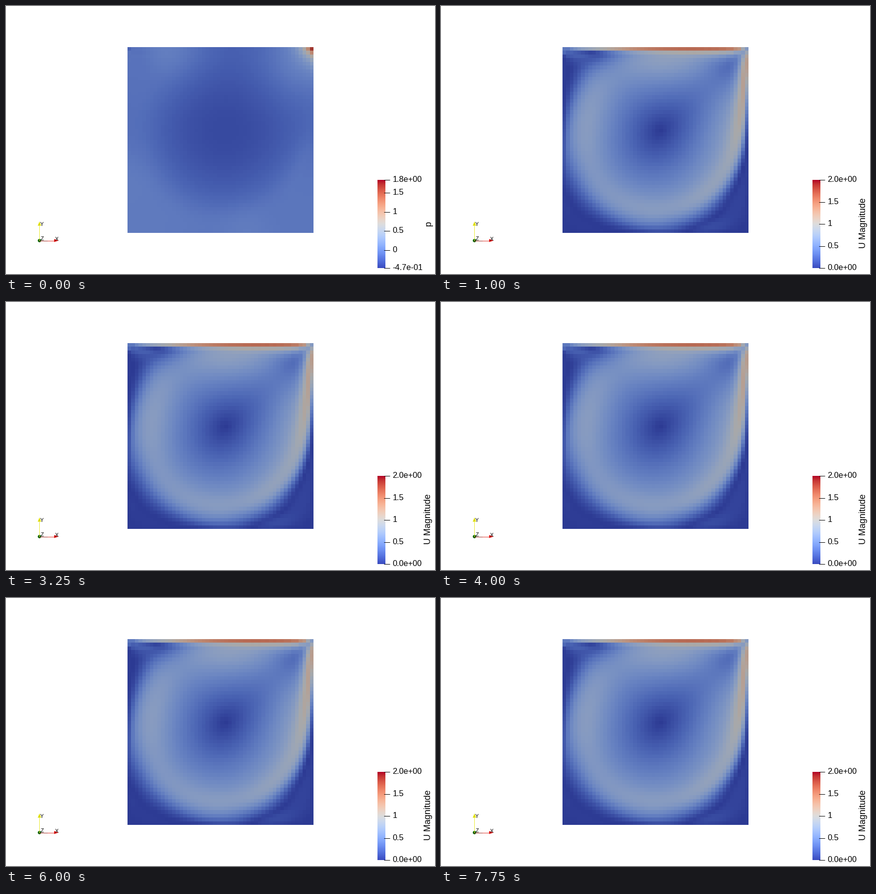
A matplotlib script that plays this animation: 865x541 px, repeating every 8 s.

```python
import numpy as np
import matplotlib.pyplot as plt
from matplotlib.animation import FuncAnimation
from matplotlib.patches import Circle, Polygon

W, H, DPI = 865, 541, 100
PX = 72 / DPI
N, REYNOLDS, LID = 50, 2000, 2.0
SHADE = 0.765
LEFT, TOP, SIDE = 245, 83, 375
BAR = (749, 765, 529, 351)
FRAMES, INTERVAL = 32, 250

plt.rcParams["font.family"] = "Liberation Sans"
cmap = plt.get_cmap("coolwarm")


def solve_cavity(n, re, dt=0.02, t_end=90):
    """Lid-driven cavity, collocated finite volumes; returns speed and pressure."""
    h, nu = 1 / n, 1 / re
    k = np.arange(n)
    basis = np.cos(np.pi * np.outer(k + 0.5, k) / n)
    basis /= np.linalg.norm(basis, axis=0)
    lam = (2 * np.cos(np.pi * k / n) - 2) / h**2
    lam = lam[:, None] + lam[None, :]
    lam[0, 0] = 1

    def with_ghosts(q, sign, lid=0.0):
        g = np.zeros((n + 2, n + 2))
        g[1:-1, 1:-1] = q
        g[0], g[-1] = sign * g[1], sign * g[-2]
        g[:, 0], g[:, -1] = sign * g[:, 1], 2 * lid + sign * g[:, -2]
        return g

    def transport(q, lid, fx, fy):
        g = with_ghosts(q, -1, lid)
        col, row = g[:, 1:-1], g[1:-1]
        flow = (np.diff(fx * (col[1:] + col[:-1]), axis=0)
                + np.diff(fy * (row[:, 1:] + row[:, :-1]), axis=1)) / (2 * h)
        lap = (col[2:] + col[:-2] + row[:, 2:] + row[:, :-2] - 4 * q) / h**2
        return q + dt * (nu * lap - flow)

    def euler(u, v, fx, fy):
        u, v = transport(u, 1.0, fx, fy), transport(v, 0.0, fx, fy)
        fx, fy = np.zeros((n + 1, n)), np.zeros((n, n + 1))
        fx[1:-1] = (u[1:] + u[:-1]) / 2
        fy[:, 1:-1] = (v[:, 1:] + v[:, :-1]) / 2
        div = (np.diff(fx, axis=0) + np.diff(fy, axis=1)) / h
        phi = basis @ ((basis.T @ div @ basis) / lam) @ basis.T
        fx[1:-1] -= np.diff(phi, axis=0) / h
        fy[:, 1:-1] -= np.diff(phi, axis=1) / h
        g = with_ghosts(phi, 1)
        u -= (g[2:, 1:-1] - g[:-2, 1:-1]) / (2 * h)
        v -= (g[1:-1, 2:] - g[1:-1, :-2]) / (2 * h)
        return (u, v, fx, fy), phi

    def blend(a, b, weight):
        return tuple((1 - weight) * p + weight * q for p, q in zip(a, b))

    # start from a single clockwise vortex
    s = np.sin(np.pi * np.linspace(0, 1, n + 1))
    psi = -0.11 * np.outer(s, s)
    fx, fy = np.diff(psi, axis=1) / h, -np.diff(psi, axis=0) / h
    state = ((fx[1:] + fx[:-1]) / 2, (fy[:, 1:] + fy[:, :-1]) / 2, fx, fy)

    # third-order strong-stability Runge-Kutta
    for _ in range(int(t_end / dt)):
        stage, _phi = euler(*state)
        stage, _phi = euler(*stage)
        stage, phi = euler(*blend(state, stage, 1 / 4))
        state = blend(state, stage, 2 / 3)
    return np.hypot(state[0], state[1]), phi / dt


# cell under each pixel; the square is a hair wider than its pixel count
offset = np.arange(SIDE) - (SIDE - 1) / 2
cell = np.floor(N / 2 + 0.9999 * offset * N / SIDE).astype(int)


def shaded(field, lo, hi):
    rgba = cmap(np.clip((field.T[::-1] - lo) / (hi - lo), 0, 1))
    rgba[..., :3] *= SHADE
    return rgba[np.ix_(cell, cell)]


speed, pressure = solve_cavity(N, REYNOLDS)
P_LO, P_HI = -0.474, 1.837
p_image = shaded(LID**2 * (pressure - pressure[0, 0]), P_LO, P_HI)
u_image = shaded(LID * speed, 0, LID)

fig = plt.figure(figsize=(W / DPI, H / DPI), dpi=DPI, facecolor="white")
ax = fig.add_axes([0, 0, 1, 1])
ax.axis("off")

view = ax.imshow(p_image, extent=(LEFT, LEFT + SIDE, TOP + SIDE, TOP),
                 interpolation="nearest", aspect="auto")
ax.imshow(np.linspace(1, 0, 256)[:, None], cmap=cmap, extent=BAR, aspect="auto")
ax.set_xlim(0, W)
ax.set_ylim(H, 0)


def label(x, y, text, size, **kw):
    return ax.text(x, y, text, fontsize=size * PX, color="black", **kw)


def legend(title, lo, hi, ticks):
    """Tick marks, tick labels and the upright title beside the colour bar."""
    parts = [label(856.5, 438.5, title, 17.9, rotation=90, ha="center",
                   va="baseline", rotation_mode="anchor")]
    for value, text in ticks:
        y = 529.1 - 178 * (value - lo) / (hi - lo)
        parts += ax.plot([762, 774], [y, y], color="black", lw=PX,
                         solid_capstyle="butt")
        parts.append(label(779.5, y + 4, text, 16.2, va="baseline"))
    return parts


p_legend = legend("p", P_LO, P_HI, [
    (P_LO, "-4.7e-01"), (0, "0"), (0.5, "0.5"), (1, "1"), (1.5, "1.5"),
    (P_HI, "1.8e+00")])
u_legend = legend("U Magnitude", 0, LID, [
    (0, "0.0e+00"), (0.5, "0.5"), (1, "1"), (1.5, "1.5"), (LID, "2.0e+00")])


def draw_axes_marker():
    x, y = 67, 474
    ax.plot([x, x], [y, 444], color="#eaea30", lw=PX)
    ax.plot([x, 84], [y, y], color="#a03028", lw=PX)
    ax.plot([84, 98], [y, y], color="#e03830", lw=PX)
    ax.add_patch(Polygon([(97, 470.5), (97, 476.5), (106, 473.5)],
                         fc="#e00808", lw=0))
    ax.add_patch(Polygon([(64, 443.5), (71, 443.5), (67.5, 435)],
                         fc="#dede08", lw=0))
    ax.add_patch(Circle((67.5, 473.5), 3.4, fc="#006400", lw=0))
    for tx, ty, text in [(72.5, 443.5, "Y"), (102.5, 474, "X"), (73, 473, "Z")]:
        label(tx, ty, text, 10.5, ha="center", va="baseline")


draw_axes_marker()


def update(i):
    show_p = i == 0
    view.set_data(p_image if show_p else u_image)
    for part in p_legend:
        part.set_visible(show_p)
    for part in u_legend:
        part.set_visible(not show_p)
    return [view, *p_legend, *u_legend]


anim = FuncAnimation(fig, update, frames=FRAMES, interval=INTERVAL, repeat=True)
plt.show()
```
